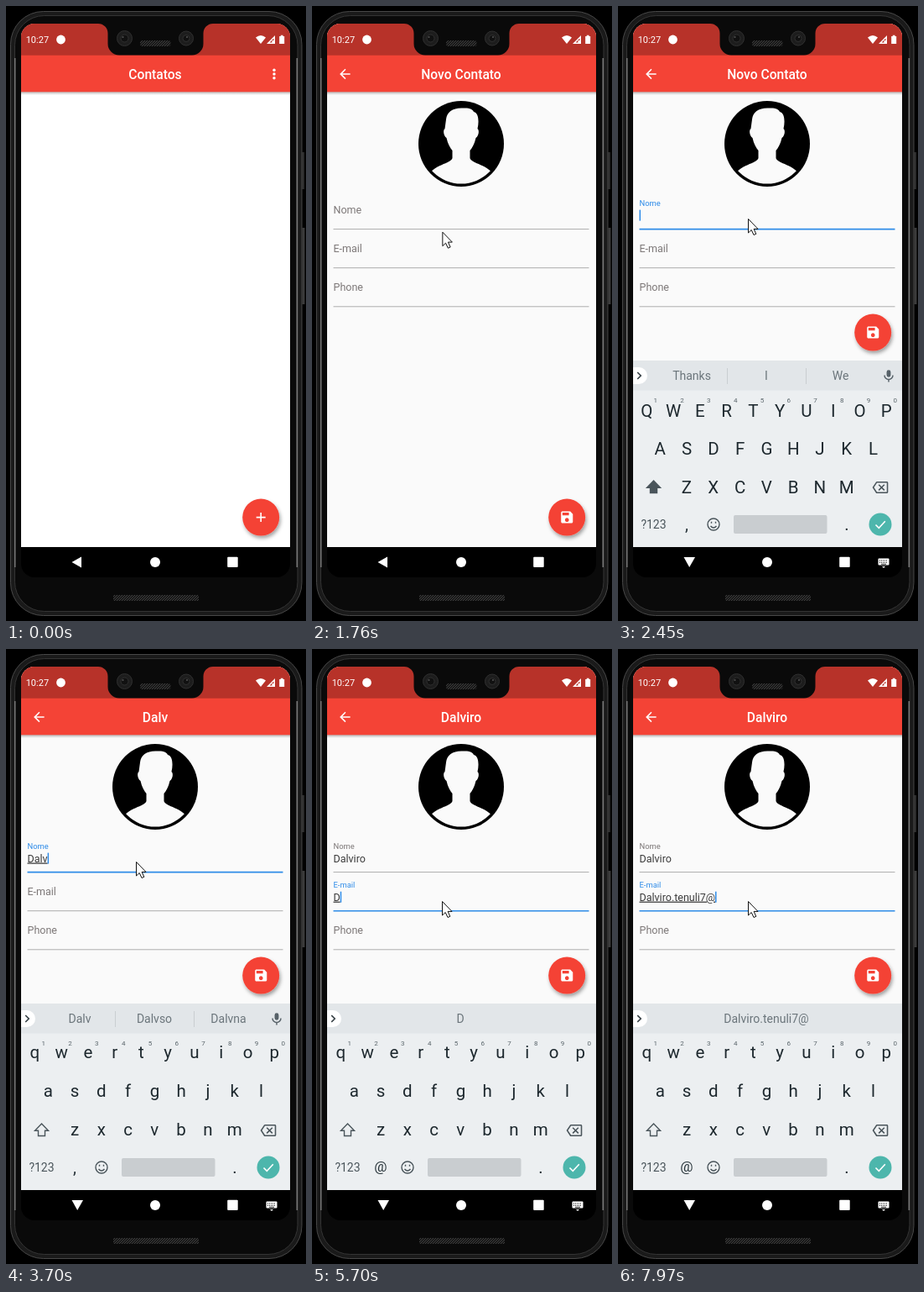
Recreate the animation shown at these times as an HTML page. Size 358 by 732 pixels, loop 8000 ms.

```html
<!DOCTYPE html>
<html lang="pt">
<head>
<meta charset="utf-8">
<title>Contatos</title>
<style>
  html, body { margin: 0; width: 100%; height: 100%; overflow: hidden; background: #000; }
  svg { display: block; width: 100%; height: 100%; }
  text { font-family: Roboto, sans-serif; white-space: pre; }
  .title { font-size: 15.6px; font-weight: 500; fill: #fff; text-anchor: middle; }
  .label, .value { font-size: 12.5px; }
  .value { fill: #3b3b3b; }
  .key { font-size: 20.5px; fill: #1d282e; text-anchor: middle; }
  .hint { font-size: 8px; fill: #59646a; text-anchor: middle; }
  .word { font-size: 14px; fill: #6b757b; text-anchor: middle; }
</style>
</head>
<body>
<svg viewBox="0 0 358 732">
  <defs>
    <clipPath id="screen"><rect x="18" y="21" width="321" height="659" rx="16"/></clipPath>
    <clipPath id="app"><rect x="18" y="21" width="321" height="623"/></clipPath>
    <clipPath id="face"><circle cx="178" cy="164" r="47.5"/></clipPath>
    <clipPath id="fabClip"><circle cx="304.2" cy="608.6" r="22"/></clipPath>
    <linearGradient id="shade" x2="0" y2="1">
      <stop stop-color="#000" stop-opacity=".28"/><stop offset="1" stop-color="#000" stop-opacity="0"/>
    </linearGradient>
    <filter id="drop" x="-40%" y="-40%" width="190%" height="190%">
      <feDropShadow dx="1.5" dy="3" stdDeviation="2.2" flood-opacity=".36"/>
    </filter>
    <pattern id="mesh" width="3" height="3" patternUnits="userSpaceOnUse">
      <rect width="3" height="3" fill="#161616"/><path d="M0 3L3 0" stroke="#444" stroke-width=".9"/>
    </pattern>
  </defs>

  <!-- Phone body -->
  <rect width="358" height="732"/>
  <path d="M354.5 174V218" stroke="#2c2c2c" stroke-width="3"/>
  <path d="M355 264V355" stroke="#3c3c3c" stroke-width="3"/>
  <rect x="5.5" y="6.5" width="347.5" height="719" rx="39" fill="#1a1a1a" stroke="#484848"/>
  <rect x="10.5" y="11.5" width="337.5" height="709" rx="35" fill="#0a0a0a" stroke="#343434"/>
  <path d="M10.7 62V668M347.3 62V668" stroke="#7a7a7a" stroke-width="1.5"/>
  <rect x="128" y="701" width="102" height="7" rx="1.5" fill="url(#mesh)"/>

  <g clip-path="url(#screen)">
    <rect x="18" y="21" width="321" height="659"/>
    <g clip-path="url(#app)">
      <g id="home">
        <rect x="18" y="21" width="321" height="623" fill="#fff"/>
        <rect x="18" y="102" width="321" height="4" fill="url(#shade)"/>
        <rect x="18" y="21" width="321" height="81.3" fill="#f44336"/>
        <text class="title" x="178" y="86.7">Contatos</text>
        <g fill="#fff"><circle cx="320" cy="76.2" r="1.7"/><circle cx="320" cy="81" r="1.7"/><circle cx="320" cy="85.8" r="1.7"/></g>
      </g>

      <g id="form">
        <rect x="18" y="21" width="321" height="625" fill="#fafafa"/>
        <rect x="18" y="102" width="321" height="4" fill="url(#shade)"/>
        <rect x="18" y="21" width="321" height="81.3" fill="#f44336"/>
        <path transform="translate(30 71.6) scale(.78)" fill="#fff" d="M20 11H7.83l5.59-5.59L12 4l-8 8 8 8 1.41-1.41L7.83 13H20z"/>
        <text class="title" id="title" x="178" y="86.7"></text>
        <circle cx="178" cy="164" r="51"/>
        <path clip-path="url(#face)" fill="#fafafa" d="M160 135C161 126 168 121 180 121.5C188 121 192 123 193 126C199 127 199.5 138 197.5 146C200 148 199 155 195.5 157C194 164 191 169 188.5 172V181C190 188 211 188 219 204V218H137V204C145 188 166 188 167.5 181V172C165 169 162 164 160.5 157C157 155 156 148 158.5 146Z"/>
        <g id="fields"></g>
      </g>

      <g id="fab">
        <circle cx="304.2" cy="608.6" r="22" fill="#f44336" filter="url(#drop)"/>
        <circle id="ripple" cx="311" cy="604" fill="#fff" fill-opacity=".22" clip-path="url(#fabClip)"/>
        <path id="plus" d="M298.7 608.6h11M304.2 603.1v11" stroke="#fff" stroke-width="1.6"/>
        <path id="save" transform="translate(294.9 599.2) scale(.78)" fill="#fff" d="M17 3H5c-1.11 0-2 .9-2 2v14c0 1.1.89 2 2 2h14c1.1 0 2-.9 2-2V7l-4-4zm-5 16c-1.66 0-3-1.34-3-3s1.34-3 3-3 3 1.34 3 3-1.34 3-3 3zm3-10H5V5h10v4z"/>
      </g>

      <g id="keyboard">
        <rect x="18" y="422" width="321" height="36" fill="#e2e6e9"/>
        <rect x="18" y="457.5" width="321" height="187" fill="#eceff1"/>
        <path d="M18 430H25A10 10 0 0 1 25 450H18Z" fill="#fff"/>
        <path d="M23.2 436l4 4-4 4" fill="none" stroke="#333d42" stroke-width="1.6"/>
        <path id="dividers" d="M130.5 431V450M224.5 431V450" stroke="#c9ced1"/>
        <g id="words"></g>
        <g id="mic" fill="none" stroke="#566168" stroke-width="1.5">
          <rect x="321.3" y="434" width="3.4" height="7" rx="1.7" fill="#566168"/>
          <path d="M318 439.5a5 5 0 0 0 10 0M323 444.5V447.5"/>
        </g>
        <g id="keys"></g>
        <path id="shift" d="M42.5 565l8 8.3h-4v6.2h-8v-6.2h-4z" stroke="#4a555b" stroke-width="1.4"/>
        <path transform="translate(303.6 563.7) scale(.78)" fill="#4a555b" d="M22 3H7c-.69 0-1.23.35-1.59.88L0 12l5.41 8.11c.36.53.9.89 1.59.89h15c1.1 0 2-.9 2-2V5c0-1.1-.9-2-2-2zm0 16H7.07L2.4 12l4.66-7H22v14zm-11.59-2L14 13.41 17.59 17 19 15.59 15.41 12 19 8.41 17.59 7 14 10.59 10.41 7 9 8.41 12.59 12 9 15.59z"/>
        <text x="42.5" y="622" text-anchor="middle" font-size="14" fill="#4a555b">?123</text>
        <text id="symbol" x="82" text-anchor="middle" fill="#29353b"></text>
        <g fill="none" stroke="#4a555b" stroke-width="1.4">
          <circle cx="114" cy="617" r="7"/><path d="M110.5 619q3.5 4 7 0"/>
          <path d="M111.5 613.7v2M116.5 613.7v2"/>
        </g>
        <rect x="138" y="606" width="111.5" height="22" rx="2" fill="#c9cdd0"/>
        <text class="key" x="273" y="624">.</text>
        <circle cx="313" cy="617" r="13.5" fill="#4db6ac"/>
        <path d="M307.5 617.5l3.8 3.8 7.5-8" fill="none" stroke="#fff" stroke-width="1.6"/>
      </g>
    </g>

    <!-- Status bar -->
    <rect x="18" y="21" width="321" height="37.7" fill="#b73229"/>
    <g fill="#fff">
      <text x="23.7" y="44" font-size="11">10:27</text>
      <circle cx="65.5" cy="40" r="5.4"/>
      <path d="M298 37.5Q304 32.5 310 37.5L304 45Z"/>
      <path d="M321 35V45H311ZM319.5 38.6L314.6 43.5H317.5V41H319.5Z" fill-rule="evenodd"/>
      <path d="M326.2 36h1.6v-1.2h2.8V36h1.6v9h-6z"/>
    </g>
    <path d="M110 21A11.5 11.5 0 0 1 121.5 32.5V45A13.5 13.5 0 0 0 135 58.5H222A13.5 13.5 0 0 0 235.5 45V32.5A11.5 11.5 0 0 1 247 21Z" fill="#0a0a0a"/>

    <!-- Navigation bar -->
    <g fill="#fff">
      <path id="back"/>
      <circle cx="178" cy="662" r="6"/>
      <rect x="264.2" y="655.8" width="12.5" height="12.3" rx="1"/>
      <g id="imeIcon">
        <rect x="310.5" y="657.5" width="13" height="8" rx="1"/>
        <path d="M312 660h10M312 662.3h10" stroke="#000" stroke-dasharray="1 1"/>
        <path d="M314 664.3h6" stroke="#000" stroke-width=".8"/>
        <path d="M315 667h4l-2 2z"/>
      </g>
    </g>
  </g>

  <!-- Cameras and earpiece -->
  <g fill="#1d1d1d" stroke="#303030">
    <circle cx="141.5" cy="38.5" r="9"/><circle cx="215" cy="38.5" r="8.5"/>
    <circle cx="141.5" cy="38.5" r="4.5" fill="#111"/><circle cx="215" cy="38.5" r="4" fill="#111"/>
  </g>
  <circle cx="139.5" cy="37" r="1" fill="#555"/><circle cx="216" cy="37" r="1" fill="#555"/>
  <rect x="160" y="41" width="36.5" height="7" rx="3" fill="url(#mesh)"/>

  <g id="pointer">
    <circle id="press" r="15" fill="#ff0" fill-opacity=".52"/>
    <path d="M.5 .5V17L4.2 13.5L7 19.5L9.8 18.3L7.1 12.4H12Z" fill="#fff" stroke="#111"/>
  </g>
</svg>
<script>
const DURATION = 8000, BLUE = '#2f8ce8';
const NAME = 'Dalviro', EMAIL = 'Dalviro.tenuli7@';
const $ = id => document.getElementById(id);
const clamp = v => Math.max(0, Math.min(1, v));
const mix = (a, b, p) => a + (b - a) * p;
const show = (node, on) => { node.style.display = on ? '' : 'none'; };
const setText = (node, s) => { if (node.textContent !== s) node.textContent = s; };

function add(parent, tag, attrs, text = '') {
  const node = document.createElementNS('http://www.w3.org/2000/svg', tag);
  for (const k in attrs) node.setAttribute(k, attrs[k]);
  node.textContent = text;
  parent.append(node);
  return node;
}

// [time, number of characters typed]
const nameTyping = [[3230, 1], [3400, 2], [3550, 3], [3700, 4], [3780, 5], [3930, 6], [4010, 7]];
const emailTyping = [[5700, 1], [5870, 2], [6020, 3], [6250, 4], [6330, 5], [6400, 6], [6480, 7],
  [6650, 8], [6800, 10], [6950, 11], [7120, 12], [7190, 13], [7360, 14], [7590, 15], [7970, 16]];
// [time, x, y]
const path = [[450, 319, 711], [605, 314, 650], [760, 311, 602], [1300, 311, 602], [1530, 235, 425],
  [1760, 155, 268], [1830, 155, 253], [4450, 155, 253], [4770, 167, 308], [4850, 167, 308], [4980, 155, 300]];
const presses = [[910, 1150], [2070, 2290], [5000, 5160]];

const typedAt = (table, t) => table.reduce((last, step) => t >= step[0] ? step : last, [0, 0]);

function pointAt(t) {
  const i = path.findIndex(p => p[0] > t);
  if (i < 0) return path.at(-1).slice(1);
  if (!i) return path[0].slice(1);
  const [a, b] = [path[i - 1], path[i]], p = (t - a[0]) / (b[0] - a[0]);
  return [mix(a[1], b[1], p), mix(a[2], b[2], p)];
}

const fields = ['Nome', 'E-mail', 'Phone'].map((label, i) => {
  const g = add($('fields'), 'g', { transform: `translate(0 ${i * 46.1})` });
  return {
    line: add(g, 'line', { x1: 25.5, x2: 330.5, y1: 265.6, y2: 265.6 }),
    label: add(g, 'text', { class: 'label', x: 25.5 }, label),
    value: add(g, 'text', { class: 'value', x: 25.5, y: 253.5 }),
    caret: add(g, 'rect', { y: 242.6, width: 1.5, height: 13, fill: BLUE })
  };
});

const words = [88, 177, 265.5].map(x => add($('words'), 'text', { class: 'word', x, y: 445.2 }));

const keys = [['QWERTYUIOP', 34.3, 489], ['ASDFGHJKL', 50.3, 534.3], ['ZXCVBNM', 82, 580.2]]
  .flatMap(([row, x0, y], r) => [...row].map((letter, i) => {
    const x = x0 + i * 31.78;
    if (!r) add($('keys'), 'text', { class: 'hint', x: x + 10.5, y: 471.5 }, (i + 1) % 10);
    return { letter, y, node: add($('keys'), 'text', { class: 'key', x }) };
  }));

function drawField(field, { float = 0, focused = false, text = '', composing = false, caret = false }) {
  field.line.setAttribute('stroke', focused ? BLUE : '#a4a4a4');
  field.line.setAttribute('stroke-width', focused ? 1.6 : 0.9);
  field.label.setAttribute('y', mix(247.2, 237.6, float));
  field.label.style.fontSize = mix(12.5, 9.4, float) + 'px';
  field.label.setAttribute('fill', focused ? BLUE : '#7d7878');
  setText(field.value, text);
  field.value.setAttribute('text-decoration', composing ? 'underline' : 'none');
  show(field.caret, caret);
  if (caret) field.caret.setAttribute('x', 25.5 + (text ? field.value.getComputedTextLength() : 0));
}

function drawKeyboard(t, name, email) {
  const up = clamp((t - 2130) / 240), lower = !!name;
  show($('keyboard'), t >= 2200);
  $('keyboard').setAttribute('transform', `translate(0 ${222 * (1 - up) ** 2})`);
  for (const { letter, y, node } of keys) {
    setText(node, lower ? letter.toLowerCase() : letter);
    node.setAttribute('y', lower ? y - 1.7 : y);
  }
  $('shift').setAttribute('fill', lower ? 'none' : '#4a555b');

  const onEmail = t >= 5240;
  setText($('symbol'), onEmail ? '@' : ',');
  $('symbol').setAttribute('font-size', onEmail ? 17 : 20);
  $('symbol').setAttribute('y', onEmail ? 622 : 624);
  let list = ['Thanks', 'I', 'We'];
  if (onEmail) list = ['', email.endsWith('.') ? '' : email, ''];
  else if (name) list = [name, name + 'so', name + 'na'];
  words.forEach((node, i) => setText(node, list[i]));
  show($('dividers'), !onEmail);
  show($('mic'), !onEmail);
}

function render(t) {
  // Movement refreshes about 13 times a second.
  const tick = t < 450 ? t : 450 + Math.floor((t - 442) / 77) * 77;

  const enter = clamp((tick - 1170) / 300);
  show($('form'), t >= 1300);
  $('form').setAttribute('opacity', enter ** 1.5);
  $('form').setAttribute('transform', `translate(0 ${160 * (1 - enter) ** 2.4})`);

  const [nameTime, nameCount] = typedAt(nameTyping, t);
  const [emailTime, emailCount] = typedAt(emailTyping, t);
  const name = NAME.slice(0, nameCount), email = EMAIL.slice(0, emailCount);
  const onEmail = t >= 5160, focused = t >= 2140, open = t >= 2200;
  const blink = since => Math.floor((t - since) / 460) % 2 === 0;
  setText($('title'), name || 'Novo Contato');

  drawField(fields[0], {
    float: clamp((tick - 2090) / 200), focused: focused && !onEmail, text: name,
    composing: !!name && !onEmail,
    caret: open && !onEmail && blink(nameTime || 1470)
  });
  drawField(fields[1], {
    float: clamp((tick - 5090) / 200), focused: onEmail, text: email,
    composing: !!email && !email.endsWith('.'),
    caret: t >= 5240 && blink(emailTime || 5240)
  });
  drawField(fields[2], {});

  drawKeyboard(tick, name, email);
  $('fab').setAttribute('transform', `translate(0 ${open ? -220 : 0})`);
  show($('plus'), t < 1300);
  show($('save'), t >= 1300);
  show($('ripple'), t >= 910 && t < 1220);
  $('ripple').setAttribute('r', 32 * clamp((tick - 850) / 300));
  show($('imeIcon'), open);
  $('back').setAttribute('d', open ? 'M78.5 656H92L85.2 668Z' : 'M78.5 662L90 655.5V668.5Z');

  const [x, y] = pointAt(tick);
  show($('pointer'), t >= 450);
  $('pointer').setAttribute('transform', `translate(${x} ${y})`);
  show($('press'), presses.some(([a, b]) => t >= a && t < b));
}

const start = performance.now();
function loop() {
  render((performance.now() - start) % DURATION);
  requestAnimationFrame(loop);
}
loop();
</script>
</body>
</html>
```
